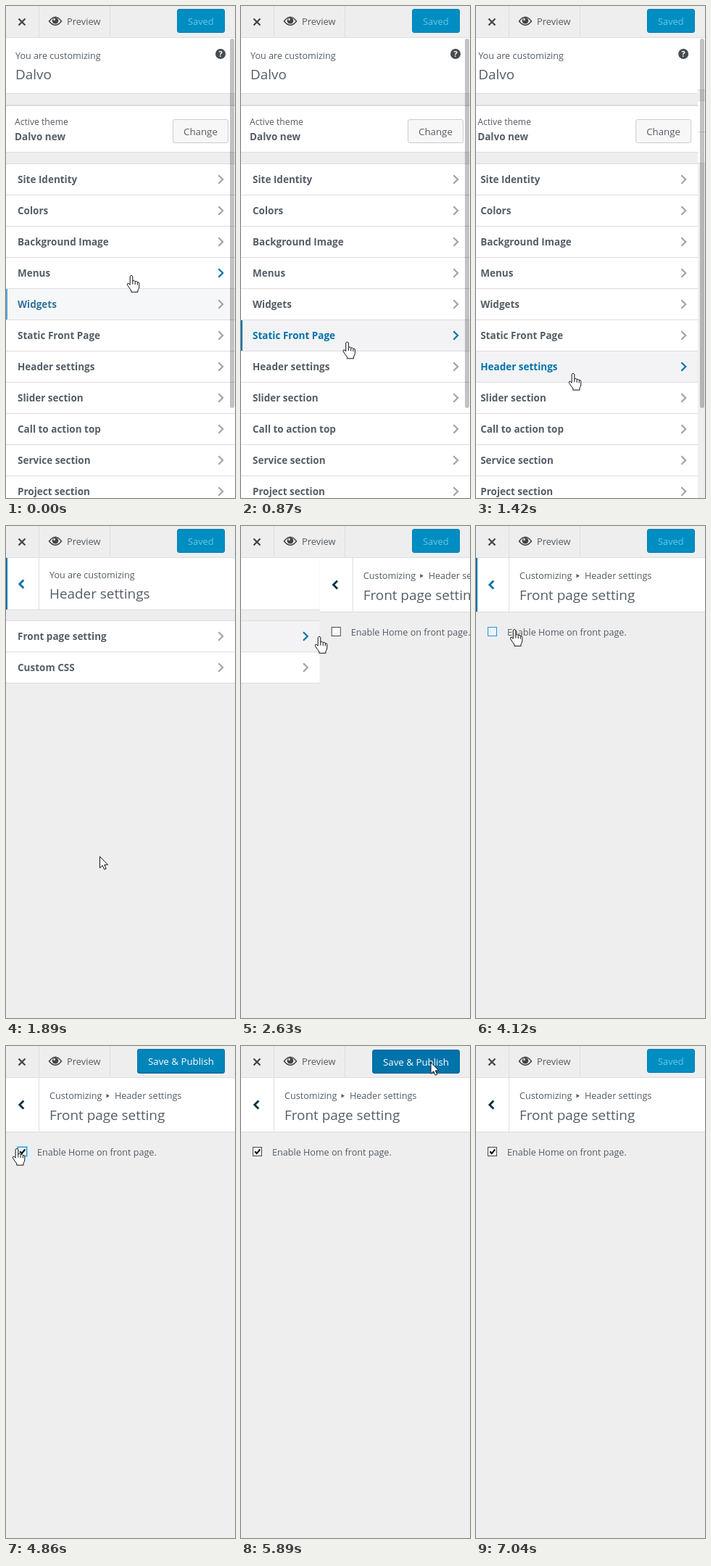
An HTML page that plays this animation: 316 by 678 pixels, repeating every 7700 ms.

```html
<!DOCTYPE html>
<html lang="en">
<head>
<meta charset="utf-8">
<title>Theme customizer</title>
<style>
  html, body { margin: 0; width: 100%; height: 100%; overflow: hidden; background: #eee; }
  svg { display: block; width: 316px; height: 678px; }
  text { font: 12.6px "Open Sans", "Noto Sans", sans-serif; fill: #555d66; white-space: pre; }
  .bold { font-size: 13.5px; font-weight: 700; }
  .title { font-size: 18.9px; }
  .line { fill: #ddd; }
</style>
</head>
<body>
<svg id="stage" viewBox="0 0 316 678" xmlns="http://www.w3.org/2000/svg"></svg>
<script>
const LOOP = 7700, WIDTH = 316, BLUE = '#0073aa', ROW = 43;

// Screen updates come in bursts: first update, last update, count.
const bursts = [
  [0, 80, 2], [470, 1150, 8], [1420, 2090, 8], [2200, 2360, 3], [2550, 3270, 9], [3470, 4220, 9],
  [4300, 5050, 9], [5150, 5230, 2], [5440, 6190, 9], [6270, 6570, 4], [6950, 7040, 2]
];

// Pointer path: time, x, y.
const path = [
  [0, 173, 371], [380, 173, 371], [1150, 134, 506], [1707, 134, 506], [1899, 129, 455],
  [2090, 118, 203], [2360, 108, 152], [2830, 108, 152], [3270, 32, 140], [3400, 32, 140],
  [3845, 210, 143], [4220, 24, 142], [4300, 15, 141], [4862, 15, 141], [5050, 249, 194],
  [5350, 249, 194], [5627, 261.5, 22], [6860, 261.5, 22], [6950, 261.5, 240]
];

const menu = ['Site Identity', 'Colors', 'Background Image', 'Menus', 'Widgets', 'Static Front Page',
  'Header settings', 'Slider section', 'Call to action top', 'Service section', 'Project section'];
const submenu = ['Front page setting', 'Custom CSS'];

const rect = (x, y, w, h, fill, extra = '') =>
  `<rect x="${x}" y="${y}" width="${w}" height="${h}" fill="${fill}" ${extra}/>`;
const line = (x, y, w, h) => rect(x, y, w, h, '', 'class="line"');
const text = (x, y, s, cls = '', extra = '') => `<text x="${x}" y="${y}" class="${cls}" ${extra}>${s}</text>`;
const stroke = (d, color, width) =>
  `<path d="${d}" fill="none" stroke="${color}" stroke-width="${width}"/>`;
const group = (id, body) => `<g id="${id}">${body}</g>`;
const button = (x, y, w, h, fill, border) =>
  rect(x + .5, y + .5, w - 1, h - 1, fill, `stroke="${border}" rx="2.5"`);

function rows(id, labels, top) {
  return labels.map((label, i) => {
    const y = top + i * ROW;
    return group(id + i,
      rect(0, y, WIDTH, ROW - 1, '#fff') + rect(0, y, 2, ROW - 1, 'none') +
      line(0, y + ROW - 1, WIDTH, 1) + text(16, y + 26, label, 'bold') +
      stroke(`M293.3 ${y + 15.2}l5.8 5.8l-5.8 5.8`, '#a0a5aa', 2.2));
  }).join('');
}

function backHeader(bottom, id) {
  const y = bottom === 115 ? 80 : 81;
  return rect(0, 44, WIDTH, bottom - 44, '#fff') + line(0, bottom, WIDTH, 1) + line(45, 44, 1, bottom - 44) +
    group(id, rect(0, 44, 2, bottom - 44, BLUE) + stroke(`M24.3 ${y - 5.5}l-5.5 5.5l5.5 5.5`, BLUE, 2.8));
}

const rootPane = rect(0, 44, WIDTH, 634, '#eee') +
  rect(0, 44, WIDTH, 76, '#fff') + line(0, 120, WIDTH, 1) +
  text(13, 73, 'You are customizing') + text(13, 101, 'Dalvo', 'title') +
  '<circle cx="296" cy="66" r="7" fill="#464b50"/>' +
  text(296, 70, '?', '', 'style="font-size:11px;font-weight:700;fill:#fff" text-anchor="middle"') +
  line(0, 136, WIDTH, 2) + rect(0, 138, WIDTH, 63, '#fff') + line(0, 201, WIDTH, 1) +
  text(12, 164, 'Active theme', '', 'style="font-size:12.2px"') + text(12, 185, 'Dalvo new', 'bold') +
  button(230, 156, 77, 33, '#f7f7f7', '#ccc') + text(245, 178, 'Change', '', 'style="font-size:13.3px"') +
  line(0, 217, WIDTH, 1) + rows('menu', menu, 218);

const panelPane = rect(0, 44, WIDTH, 634, '#eee') + backHeader(115, 'panelBack') +
  text(60, 72, 'You are customizing') + text(60, 100, 'Header settings', 'title') +
  rect(60, 104, 150, 8, '#fff') + line(0, 130, WIDTH, 1) + rows('sub', submenu, 131);

const sectionPane = rect(0, 44, WIDTH, 634, '#eee') + backHeader(118, 'sectionBack') +
  text(60, 73, 'Customizing') + '<path d="M138.5 66l4.5 2.7l-4.5 2.7z" fill="#555d66"/>' +
  text(150, 73, 'Header settings') + text(60, 102, 'Front page setting', 'title') +
  group('ring', rect(13, 134, 23, 25, '#e6f1f6') +
    rect(15.5, 138.5, 14, 14, 'none', 'stroke="#9cc8e2"')) +
  rect(16.5, 139.5, 12, 12, '#fff', 'id="box"') +
  group('check', stroke('M19.3 145.3l2.4 2.8l4.6-5.6', '#111', 2.2)) +
  text(43, 151, 'Enable Home on front page.');

const topBar = rect(0, 0, WIDTH, 43, '#eee') + line(0, 43, WIDTH, 1) + line(45, 0, 1, 43) + line(143, 0, 1, 43) +
  stroke('M17.5 17.5l9 9M26.5 17.5l-9 9', '#444', 2.2) +
  stroke('M59.5 21Q68 9.5 76.5 21Q68 31.5 59.5 21z', '#444', 1.5) +
  '<circle cx="68" cy="20.3" r="4.3" fill="#444"/><circle cx="66.6" cy="18.6" r="1.4" fill="#eee"/>' +
  text(84, 26, 'Preview', '', 'style="font-size:12.9px"') +
  group('saved', button(236, 4, 66, 33, '#008ec2', '#007cb2') +
    text(251, 26, 'Saved', '', 'style="font-size:12.8px;fill:#66c6e4"')) +
  group('publish', button(181, 4, 121, 34, '#006799', '#006799') +
    button(181, 4, 121, 33, '#0085ba', '#0073aa') +
    text(196, 26, 'Save &amp; Publish', '', 'style="font-size:13.3px;fill:#fff"')) +
  group('spinner', '<circle cx="166" cy="21" r="8" fill="#8a8a8a"/><circle id="dot" r="2" fill="#eee"/>');

const hand = 'M-1.8 1.5Q0-1 1.8 1.5V8Q3.6 6.3 5.2 8.6Q7 7.4 8.3 9.6Q10.6 8.8 10.8 11.5V16Q10.6 18.5 9 20.5V23.2' +
  'H-.2V21Q-3 17.5-5.6 13.2Q-5.8 10.7-3.6 11.3L-1.8 13.2z';
const arrow = 'M.5.5V16.2L4.2 12.8L6.7 18.3L9.2 17.2L6.7 11.9H11.5z';
const pointer = (id, d, details = '') =>
  group(id, `<path d="${d}" fill="#fff" stroke="#111" stroke-linejoin="round"/>` + details);

const stage = document.getElementById('stage');
stage.innerHTML = rect(0, 0, WIDTH, 678, '#eee') +
  group('root', rootPane) + group('panel', panelPane) + group('section', sectionPane) +
  rect(309, 45, 6, 509, '#000', 'id="scrollbar" rx="3" opacity=".24"') + topBar +
  group('pointer', pointer('hand', hand, stroke('M1.8 8v4.5M5.2 9v4M8.3 10v3.5', '#111', 1)) +
    pointer('arrow', arrow));

const $ = id => document.getElementById(id);
const show = (id, on) => $(id).setAttribute('display', on ? 'inline' : 'none');
const move = (id, x, y = 0) => $(id).setAttribute('transform', `translate(${x.toFixed(2)} ${y.toFixed(2)})`);
const clamp = v => Math.max(0, Math.min(1, v));
const smooth = v => v * v * (3 - 2 * v);
const slideIn = (t, start) => smooth(clamp((t - start) / 180));

// Hold the picture between updates.
function snap(t) {
  let held = 0;
  for (const [first, last, count] of bursts) {
    const gap = (last - first) / (count - 1), slack = count > 4 ? 20 : 0;
    if (t < first) break;
    held = first + gap * Math.min(count - 1, Math.floor((t - first + slack) / gap));
  }
  return held;
}

function pointerAt(t) {
  const next = path.findIndex(p => p[0] > t);
  if (next < 0) return path[path.length - 1].slice(1);
  const a = path[next - 1], b = path[next];
  const k = smooth((t - a[0]) / (b[0] - a[0]));
  return [a[1] + (b[1] - a[1]) * k, a[2] + (b[2] - a[2]) * k];
}

function paintRow(id, fill, bar, ink, chevron) {
  const [back, edge, , label, mark] = $(id).children;
  back.setAttribute('fill', fill);
  edge.setAttribute('fill', bar);
  label.style.fill = ink;
  mark.setAttribute('stroke', chevron);
}

function paintRows(id, labels, active) {
  labels.forEach((_, i) => i === active
    ? paintRow(id + i, '#f3f3f5', BLUE, BLUE, BLUE)
    : paintRow(id + i, '#fff', 'none', '#555d66', '#a0a5aa'));
}

function paintBack(id, focused) {
  const [edge, mark] = $(id).children;
  edge.setAttribute('display', focused ? 'inline' : 'none');
  mark.setAttribute('stroke', focused ? BLUE : '#063240');
}

function paintPublish(saving, pressed) {
  const [shadow, face, label] = $('publish').children;
  shadow.setAttribute('display', saving || pressed ? 'none' : 'inline');
  face.setAttribute('fill', saving ? '#008ec2' : pressed ? BLUE : '#0085ba');
  face.setAttribute('stroke', saving ? '#007cb2' : pressed ? '#006799' : BLUE);
  label.style.fill = saving ? '#66c6e4' : '#fff';
  move('publish', 0, pressed ? 1 : 0);
}

function draw(time) {
  const t = snap(time);
  const [x, y] = pointerAt(t);
  const toPanel = slideIn(t, 1401), toSection = slideIn(t, 2531);

  move('root', -WIDTH * toPanel);
  move('panel', WIDTH * (1 - toPanel - toSection));
  move('section', WIDTH * (1 - toSection));
  show('root', toPanel < 1);
  show('panel', toPanel > 0 && toSection < 1);
  show('section', toSection > 0);
  show('scrollbar', toPanel < 1);

  paintRows('menu', menu, Math.floor((y - 218) / ROW));
  if (t < 80) {
    paintRow('menu3', '#fff', 'none', '#555d66', BLUE);
    paintRow('menu4', '#f5f7f9', '#5ba3c9', '#32739b', '#a0a5aa');
  }
  paintRows('sub', submenu, t > 2000 ? Math.floor((y - 131) / ROW) : -1);

  const checked = t >= 4300, hover = t > 3100 && t < 4950;
  paintBack('panelBack', toPanel === 1);
  paintBack('sectionBack', toSection === 1 && !checked);
  show('check', checked);
  show('ring', checked && t < 5150);
  $('box').setAttribute('stroke', hover ? '#2b95d6' : '#444');
  $('box').setAttribute('fill', hover ? '#eaf5fc' : '#fff');

  const publish = checked && t < 6560;
  const saving = publish && t >= 6150;
  show('publish', publish);
  show('saved', !publish);
  show('spinner', saving);
  paintPublish(saving, t > 5800 && !saving);
  const turn = t / 700 * 2 * Math.PI;
  move('dot', 166 + 4.6 * Math.cos(turn), 21 + 4.6 * Math.sin(turn));

  const pointing = t < 1600 || (t > 2050 && t < 4950);
  move('pointer', x, y);
  show('pointer', t < 7040);
  show('hand', pointing);
  show('arrow', !pointing);
}

const begin = performance.now();
function frame() {
  draw((performance.now() - begin) % LOOP);
  requestAnimationFrame(frame);
}
frame();
</script>
</body>
</html>
```
